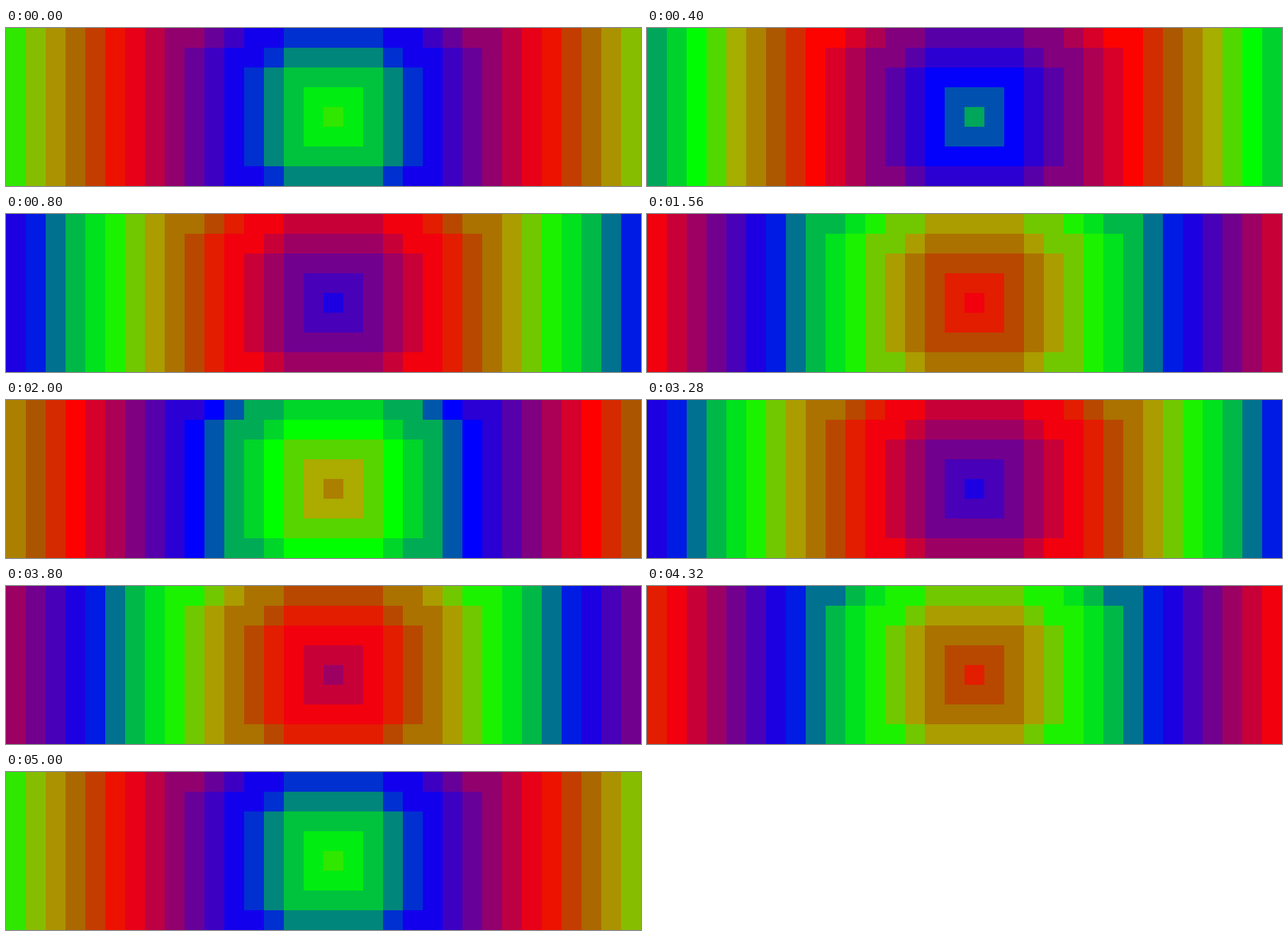
Recreate the animation shown at these times as an HTML page with a canvas. Size 1024x256 px, loop 5.04 s.

```html
<!DOCTYPE html>
<html>
<head>
<meta charset="utf-8">
<style>
html, body { margin: 0; width: 100%; height: 100%; overflow: hidden; background: #000; }
canvas { display: block; }
</style>
</head>
<body>
<canvas id="stage" width="1024" height="256"></canvas>
<script>
const ctx = document.getElementById('stage').getContext('2d');
const CELL = 32, COLS = 32, ROWS = 8;
const CENTER_X = 16, CENTER_Y = 4;
const LOOP = 5040, STEP = 40;

// Sixteen rainbow stops, 16 hue units apart.
const RAINBOW = [
  0xff0000, 0xd52a00, 0xab5500, 0xab7f00, 0xabab00, 0x56d500, 0x00ff00, 0x00d52a,
  0x00ab55, 0x0056aa, 0x0000ff, 0x2a00d5, 0x5500ab, 0x7f0081, 0xab0055, 0xd5002b
].map(c => [c >> 16, c >> 8 & 255, c & 255]);

// Time in ms and accumulated hue; two full turns per loop.
const KEYS = [[0, 87], [800, 171], [1560, 251], [2000, 304], [3280, 427], [4320, 523], [5000, 599]];

function hueAt(time) {
  const next = Math.max(1, KEYS.findIndex(key => time <= key[0]));
  const [t0, h0] = KEYS[next - 1], [t1, h1] = KEYS[next];
  return Math.round(h0 + (h1 - h0) * (time - t0) / (t1 - t0));
}

function rainbow(hue) {
  const pos = hue / 16, i = Math.floor(pos), mix = pos - i;
  const from = RAINBOW[i % 16], to = RAINBOW[(i + 1) % 16];
  return `rgb(${from.map((v, k) => Math.round(v + (to[k] - v) * mix)).join()})`;
}

function draw(now) {
  const hue = hueAt(Math.floor(now % LOOP / STEP) * STEP);
  for (let y = 0; y < ROWS; y++) {
    for (let x = 0; x < COLS; x++) {
      const ring = Math.floor(Math.hypot(x - CENTER_X, y - CENTER_Y));
      ctx.fillStyle = rainbow(hue + ring * 16);
      ctx.fillRect(x * CELL, y * CELL, CELL, CELL);
    }
  }
}

const start = performance.now();
function tick() {
  draw(performance.now() - start);
  requestAnimationFrame(tick);
}
tick();
</script>
</body>
</html>
```
